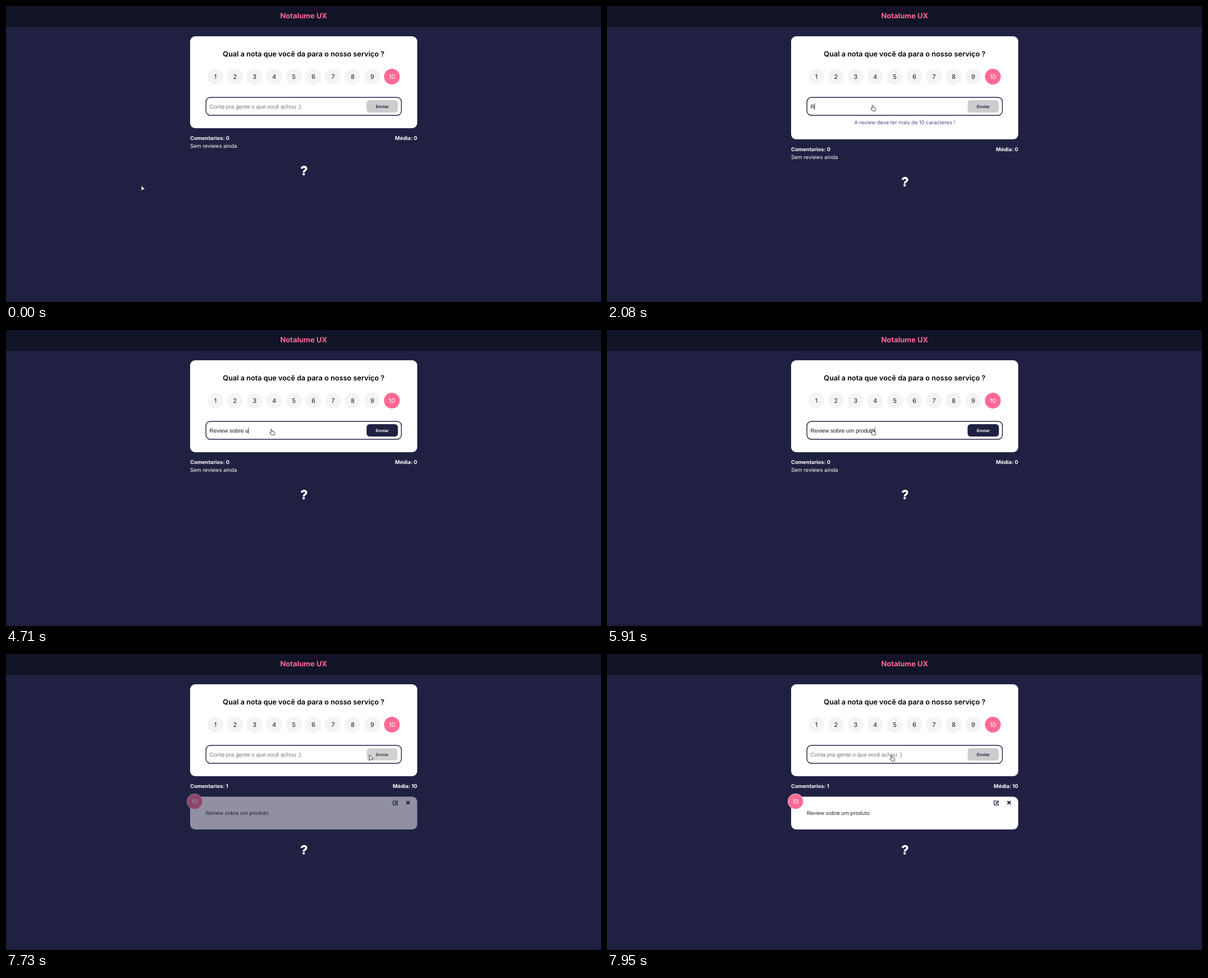
Recreate the animation shown at these times as an HTML page. Size 1060 by 528 pixels, loop 8000 ms.

```html
<!DOCTYPE html>
<html lang="pt">
<head>
<meta charset="utf-8">
<title>Notalume UX</title>
<style>
  html, body { margin: 0; width: 100%; height: 100%; overflow: hidden; background: #202142; }
  svg { display: block; width: 100vw; height: 100vh; font-family: Inter, "Open Sans", sans-serif; }
  text { white-space: pre; text-rendering: geometricPrecision; }
  .mid { text-anchor: middle; }
  .bold { font-weight: 700; }
  .arial { font-family: "Liberation Sans", Arial, sans-serif; }
</style>
</head>
<body>
<svg viewBox="0 0 1060 528">
  <rect width="1060" height="528" fill="#202142"/>
  <rect y="524" width="1060" height="4" fill="#1d1e3c"/>
  <rect width="1060" height="37.5" fill="#111326"/>
  <text class="mid bold" x="530.3" y="22.2" font-size="13" fill="#ff6a95">Notalume UX</text>

  <rect id="card" x="328" y="54" width="404.6" height="164" rx="9" fill="#fff"/>
  <text class="mid" x="530.3" y="90.2" font-size="12.7" font-weight="600">Qual a nota que você da para o nosso serviço ?</text>
  <g id="scores" class="mid" font-size="11"></g>
  <rect x="356.2" y="163" width="348.2" height="32" rx="8" fill="#fff" stroke="#202142" stroke-width="1.4"/>
  <text id="field" class="arial" x="362.5" y="182.5" font-size="10.05"></text>
  <rect id="caret" y="173.5" width="0.8" height="11.5" fill="#111"/>
  <g id="button">
    <rect id="face" x="642.4" y="168" width="55.8" height="22" rx="5.5"/>
    <text id="label" class="mid bold arial" x="670.3" y="181.8" font-size="7.6">Enviar</text>
  </g>
  <text id="warning" class="mid" x="530.3" y="211.4" font-size="9.27" fill="#5f468c">A review deve ter mais de 10 caracteres !</text>

  <g id="stats" fill="#fff" font-size="9.3">
    <text id="count" class="bold" x="328" y="239.3"></text>
    <text id="mean" class="bold" x="732.6" y="239.3" text-anchor="end"></text>
    <text id="empty" x="328" y="253.4" font-size="9.43">Sem reviews ainda</text>
  </g>

  <g id="review">
    <rect x="328" y="254.5" width="404.6" height="58.5" rx="9" fill="#fff"/>
    <circle cx="336" cy="263" r="13.7" fill="#ff6a95" stroke="#eee" stroke-width="0.8"/>
    <text class="mid" x="336" y="267" font-size="11" fill="#fff">10</text>
    <text x="355.8" y="287" font-size="9.29" fill="#222">Review sobre um produto</text>
    <g fill="none" stroke="#202142">
      <path d="M694.5 262.2H689.8V269.3H697.2V266" stroke-width="1.3"/>
      <path d="M693 267L697.9 262" stroke-width="2.3"/>
      <path d="M713.5 262.3L719.2 268M719.2 262.3L713.5 268" stroke-width="2"/>
    </g>
  </g>

  <g id="question">
    <path d="M526.4 290.2C528 285.7 534.9 285.8 534.9 290.1C534.9 293.5 530.3 293.2 530.3 297" fill="none" stroke="#fff" stroke-width="3.6"/>
    <circle cx="530.3" cy="300" r="2.2" fill="#fff"/>
  </g>

  <g id="cursor" fill="#fff" stroke="#151515" stroke-width="0.8" stroke-linejoin="round">
    <path id="arrow" d="M0 0V10L2.6 7.6L6.8 7.2Z"/>
    <path id="hand" d="M-1 6.6V1a1 1 0 0 1 2 0V4L4.6 4.7Q6 5 5.9 6.4L5.2 10.2H0L-2.9 6.6Q-3 5.2-1 6.6Z"/>
  </g>
</svg>
<script>
const LOOP = 8000, FOCUS = 1080, SEND = 7490, POST = 7600, FADE = 260;
const SHIFT = 19.8;
const TEXT = "Review sobre um produto";
const KEYS = [2080, 2240, 2520, 2900, 3070, 3240, 3810, 4030, 4100, 4270, 4370, 4540,
  4640, 4710, 4940, 5110, 5330, 5430, 5500, 5610, 5700, 5800, 5910];
// time, x, y of the pointer tip
const PATH = [[0, 241, 320], [210, 241, 320], [1010, 473, 172], [1080, 473, 172], [1130, 473, 177],
  [6410, 473, 177], [7160, 674, 178], [7490, 675, 177], [7580, 675, 177], [7730, 648, 180], [7950, 507, 181]];

const el = {};
document.querySelectorAll("[id]").forEach(node => el[node.id] = node);
const set = (node, name, value) => node.setAttribute(name, value);
const show = (node, on) => set(node, "visibility", on ? "visible" : "hidden");
const moveY = (node, y) => set(node, "transform", `translate(0 ${y})`);
const write = (node, text) => { if (node.textContent !== text) node.textContent = text; };

for (let n = 1; n <= 10; n++) {
  const x = 372.9 + (n - 1) * 34.95, on = n === 10;
  el.scores.innerHTML += `<circle cx="${x}" cy="126" r="14" fill="${on ? "#ff6a95" : "#f4f4f4"}"/>
    <text x="${x}" y="130" fill="${on ? "#fff" : "#1c1c1c"}">${n}</text>`;
}

function pointer(t) {
  const i = PATH.findIndex(p => p[0] > t);
  if (i < 0) return PATH[PATH.length - 1].slice(1);
  const [t0, x0, y0] = PATH[i - 1], [t1, x1, y1] = PATH[i];
  let k = (t - t0) / (t1 - t0);
  if (t1 - t0 > 500) k = k * k * (3 - 2 * k);
  return [x0 + (x1 - x0) * k, y0 + (y1 - y0) * k];
}

function draw(t) {
  const sent = t >= SEND, posted = t >= POST;
  const typed = sent ? 0 : KEYS.filter(k => k <= t).length;
  const ready = typed >= 10, warn = typed > 0 && !ready;
  const shift = warn ? SHIFT : 0;

  write(el.field, typed ? TEXT.slice(0, typed) : "Conta pra gente o que você achou :)");
  set(el.field, "fill", typed ? "#16161f" : "#757575");
  const lastKey = typed ? KEYS[typed - 1] : FOCUS;
  show(el.caret, t >= FOCUS && !sent && Math.floor((t - lastKey) / 500) % 2 === 0);
  set(el.caret, "x", 362.3 + (typed ? el.field.getComputedTextLength() : 0));

  const [x, y] = pointer(t);
  const inField = x > 356 && x < 705 && y > 163 && y < 195;
  const hover = x > 642.4 && x < 698.2 && y > 168 && y < 190;
  set(el.face, "fill", ready ? "#202142" : "#ccc");
  set(el.label, "fill", ready ? "#fff" : "#202142");
  set(el.button, "opacity", hover ? 0.9 : 1);
  set(el.button, "transform", hover ? "translate(670.3 179) scale(.98) translate(-670.3 -179)" : "");

  show(el.warning, warn);
  set(el.card, "height", 164 + shift);
  moveY(el.stats, shift);
  moveY(el.question, posted ? 55.6 : shift);
  write(el.count, "Comentarios: " + (posted ? 1 : 0));
  write(el.mean, "Média: " + (posted ? 10 : 0));
  show(el.empty, !posted);
  set(el.review, "opacity", Math.min(1, Math.max(0, (t - POST) / FADE)));

  const hand = inField && (!hover || ready);
  show(el.hand, hand);
  show(el.arrow, !hand);
  set(el.cursor, "transform", `translate(${x} ${y})`);
}

const start = performance.now();
function tick() {
  draw((performance.now() - start) % LOOP);
  requestAnimationFrame(tick);
}
tick();
</script>
</body>
</html>
```
